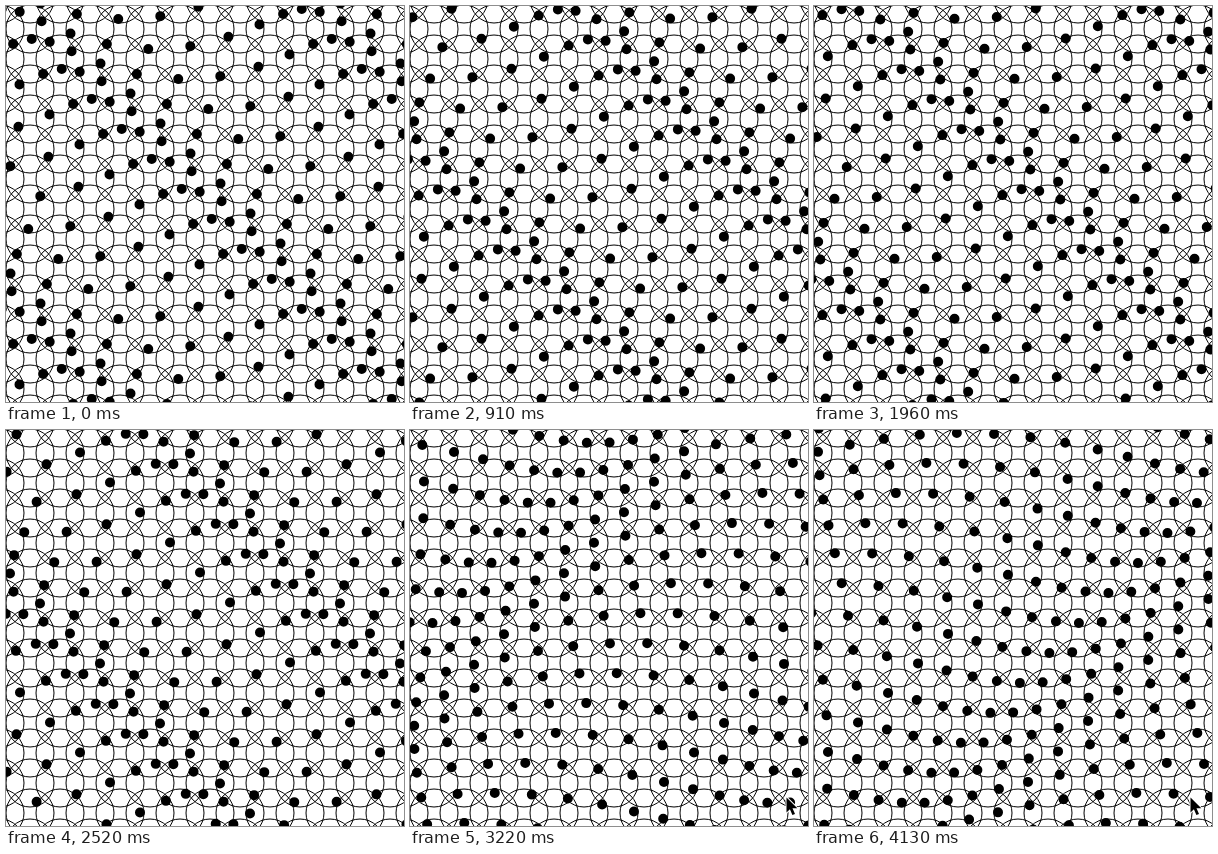
Write an HTML page with a canvas that moves like this. It is 398 px wide and 396 px high and loops after 4200 ms.

```html
<!DOCTYPE html>
<html lang="en">
<head>
<meta charset="utf-8">
<title>Circling dots</title>
<style>
html, body { margin: 0; width: 100%; height: 100%; overflow: hidden; background: #fff; }
canvas { display: block; width: 398px; height: 396px; }
</style>
</head>
<body>
<canvas id="stage"></canvas>
<script>
const W = 398, H = 396, LOOP = 4200, STEP = 70;
const CELL = 30, X0 = 24, Y0 = 23, RING = 24, ORBIT = 20, DOT = 5;
const SPEED = 0.25; // radians per step
const rad = deg => deg * Math.PI / 180;

// Each wave: start time, phase at time 0, phase shift per column and per row
const waves = [
  { from: 0, phase: rad(239), col: rad(-36), row: rad(36) },
  { from: 2870, phase: rad(58.2), col: rad(20.85), row: rad(19.45), pointer: true }
];

const canvas = document.getElementById('stage');
const scale = window.devicePixelRatio || 1;
canvas.width = Math.round(W * scale);
canvas.height = Math.round(H * scale);
const ctx = canvas.getContext('2d');
ctx.scale(scale, scale);

function eachCell(fn) {
  for (let row = -2; row <= 14; row++) {
    for (let col = -2; col <= 14; col++) {
      fn(X0 + col * CELL, Y0 + row * CELL, col, row);
    }
  }
}

const rings = new Path2D();
eachCell((x, y) => {
  rings.moveTo(x + RING, y);
  rings.arc(x, y, RING, 0, 2 * Math.PI);
});

const arrow = new Path2D('M376.5 367.5v15l3.4-3.2 2.5 5.8 2.6-1.1-2.5-5.7h4.8z');

function drawPointer() {
  ctx.lineWidth = 2;
  ctx.strokeStyle = '#fff';
  ctx.stroke(arrow);
  ctx.fill(arrow);
}

function draw(time) {
  const step = Math.floor(time / STEP);
  const wave = waves.findLast(w => step * STEP >= w.from);

  ctx.fillStyle = '#fff';
  ctx.fillRect(0, 0, W, H);
  ctx.lineWidth = 1;
  ctx.strokeStyle = ctx.fillStyle = '#000';
  ctx.stroke(rings);

  ctx.beginPath();
  eachCell((x, y, col, row) => {
    const a = wave.phase + step * SPEED + col * wave.col + row * wave.row;
    const dx = x + ORBIT * Math.cos(a), dy = y + ORBIT * Math.sin(a);
    ctx.moveTo(dx + DOT, dy);
    ctx.arc(dx, dy, DOT, 0, 2 * Math.PI);
  });
  ctx.fill();

  if (wave.pointer) drawPointer();
}

const start = performance.now();
function tick() {
  draw((performance.now() - start) % LOOP);
  requestAnimationFrame(tick);
}
tick();
</script>
</body>
</html>
```
